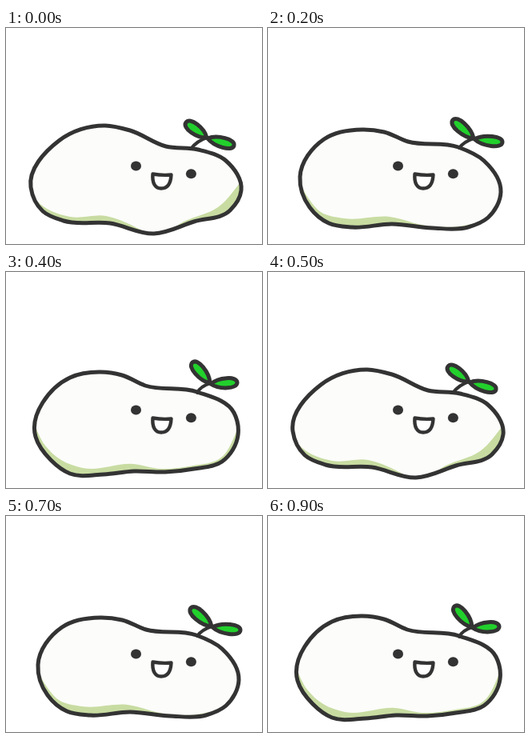
Recreate the animation shown at these times as an HTML page. Size 320 px wide and 270 px high, loop 1 s.

```html
<!DOCTYPE html>
<html lang="en">
<head>
<meta charset="utf-8">
<title>Wobbling sprout</title>
<style>
html, body { margin: 0; width: 100%; height: 100%; overflow: hidden; background: #fff; }
svg { display: block; width: 100%; height: 100%; }
</style>
</head>
<body>
<svg viewBox="0 0 320 270" fill="none" stroke="#333" stroke-width="5" stroke-linejoin="round" stroke-linecap="round">
  <clipPath id="inside"><path id="clip"/></clipPath>
  <path id="fill" fill="#fcfcfa" stroke="none"/>
  <path id="shade" fill="#c8dca2" stroke="none" clip-path="url(#inside)"/>
  <path id="outline"/>
  <path id="stem" stroke-width="4"/>
  <path id="leaves" fill="#22d02c"/>
  <g fill="#333" stroke="none">
    <ellipse cx="162.5" cy="172.6" rx="6.5" ry="6"/>
    <ellipse cx="231.4" cy="182.2" rx="6.5" ry="6"/>
  </g>
  <path d="M183.5 182.5Q195 184.5 206.5 183.5C206 194 202 200.5 194 200.5C186 200.5 182.5 193 183.5 182.5Z" fill="#fff" stroke-width="4.4"/>
</svg>
<script>
const STEP = 100;

// Key points as x, y pairs; sprout holds base, foot, left tip and right tip.
const wide = {
  body: [31,199, 46,229, 72,241, 130,244, 185,257, 235,242, 280,228, 294,203, 275,166, 240,152, 200,148, 155,128, 124,122, 66,141],
  shade: [28,205, 48,224, 80,236, 125,235, 166,251, 185,262, 222,242, 265,224, 297,188],
  sprout: [251,137, 231,151, 225,118, 285,147]
};
const low = {
  body: [33,201, 52,229, 88,251, 130,253, 175,249, 225,248, 268,242, 289,221, 289,190, 268,164, 235,152, 190,145, 150,129, 118,126, 88,133, 60,146],
  shade: [30,194, 58,220, 76,231, 90,246, 115,252, 160,240, 220,236, 270,234, 292,214],
  sprout: [254,137, 233,151, 226,116, 289,149]
};
const round = {
  body: [40,186, 52,224, 76,244, 105,249, 155,245, 205,250, 250,249, 275,237, 291,205, 270,166, 238,149, 175,142, 145,130, 118,127, 70,139],
  shade: [41,196, 50,212, 66,230, 95,238, 152,236, 198,247, 245,247, 268,240, 291,214],
  sprout: [257,138, 239,150, 231,115, 293,143]
};
const square = {
  body: [37,206, 56,235, 80,252, 122,253, 160,249, 199,250, 235,246, 270,237, 290,204, 285,176, 239,150, 174,142, 145,129, 118,125, 80,132],
  shade: [35,190, 49,217, 69,235, 96,245, 159,240, 194,246, 234,242, 266,234, 293,190],
  sprout: [255,139, 239,151, 233,113, 289,138]
};

function blend(a, b) {
  const out = {};
  for (const part in a) out[part] = a[part].map((v, i) => (v + b[part][i]) / 2);
  return out;
}

function pairs(flat) {
  return Array.from({ length: flat.length / 2 }, (_, i) => flat.slice(2 * i, 2 * i + 2));
}

// Smooth path; the nearer neighbour has more say in each tangent.
function curve(flat, closed) {
  const pts = pairs(flat), n = pts.length;
  const at = i => pts[closed ? (i + n) % n : Math.max(0, Math.min(n - 1, i))];
  const gap = (a, b) => Math.hypot(b[0] - a[0], b[1] - a[1]) || 1;
  const handle = (i, len) => {
    const a = at(i - 1), p = at(i), b = at(i + 1);
    const back = gap(a, p), ahead = gap(p, b);
    const t = [0, 1].map(k => (p[k] - a[k]) * ahead / back + (b[k] - p[k]) * back / ahead);
    const scale = len / 3 / Math.hypot(...t);
    return [p[0] + t[0] * scale, p[1] + t[1] * scale];
  };
  let d = "M" + pts[0];
  for (let i = 0; i < (closed ? n : n - 1); i++) {
    const len = gap(at(i), at(i + 1));
    d += "C" + [handle(i, len), handle(i + 1, -len), at(i + 1)].join(" ");
  }
  return closed ? d + "Z" : d;
}

// Narrow at the base, rounded at the tip.
function leaf([x, y], [tx, ty], width) {
  const dx = tx - x, dy = ty - y, len = Math.hypot(dx, dy);
  const spot = (along, side) =>
    [x + dx * along - dy / len * side * width, y + dy * along + dx / len * side * width];
  return `M${x} ${y}C${spot(.3, .9)} ${spot(1, 1)} ${tx} ${ty}C${spot(1, -1)} ${spot(.3, -.9)} ${x} ${y}Z`;
}

const poses = [wide, low, round, blend(round, square), square].map(p => {
  const body = curve(p.body, true);
  const [base, foot, left, right] = pairs(p.sprout);
  return {
    clip: body, fill: body, outline: body,
    shade: curve(p.shade) + "L320 280L0 280Z",
    stem: `M${base}Q${base[0] - 12} ${base[1] + 4} ${foot}`,
    leaves: leaf(base, left, 9) + leaf([base[0] + 1, base[1] + 1], right, 8.5)
  };
});

let shown = -1;
function draw(time) {
  const i = Math.floor(time / STEP) % poses.length;
  if (i === shown) return;
  shown = i;
  for (const id in poses[i]) document.getElementById(id).setAttribute("d", poses[i][id]);
}

const start = performance.now();
function tick() {
  draw(performance.now() - start);
  requestAnimationFrame(tick);
}
tick();
</script>
</body>
</html>
```
